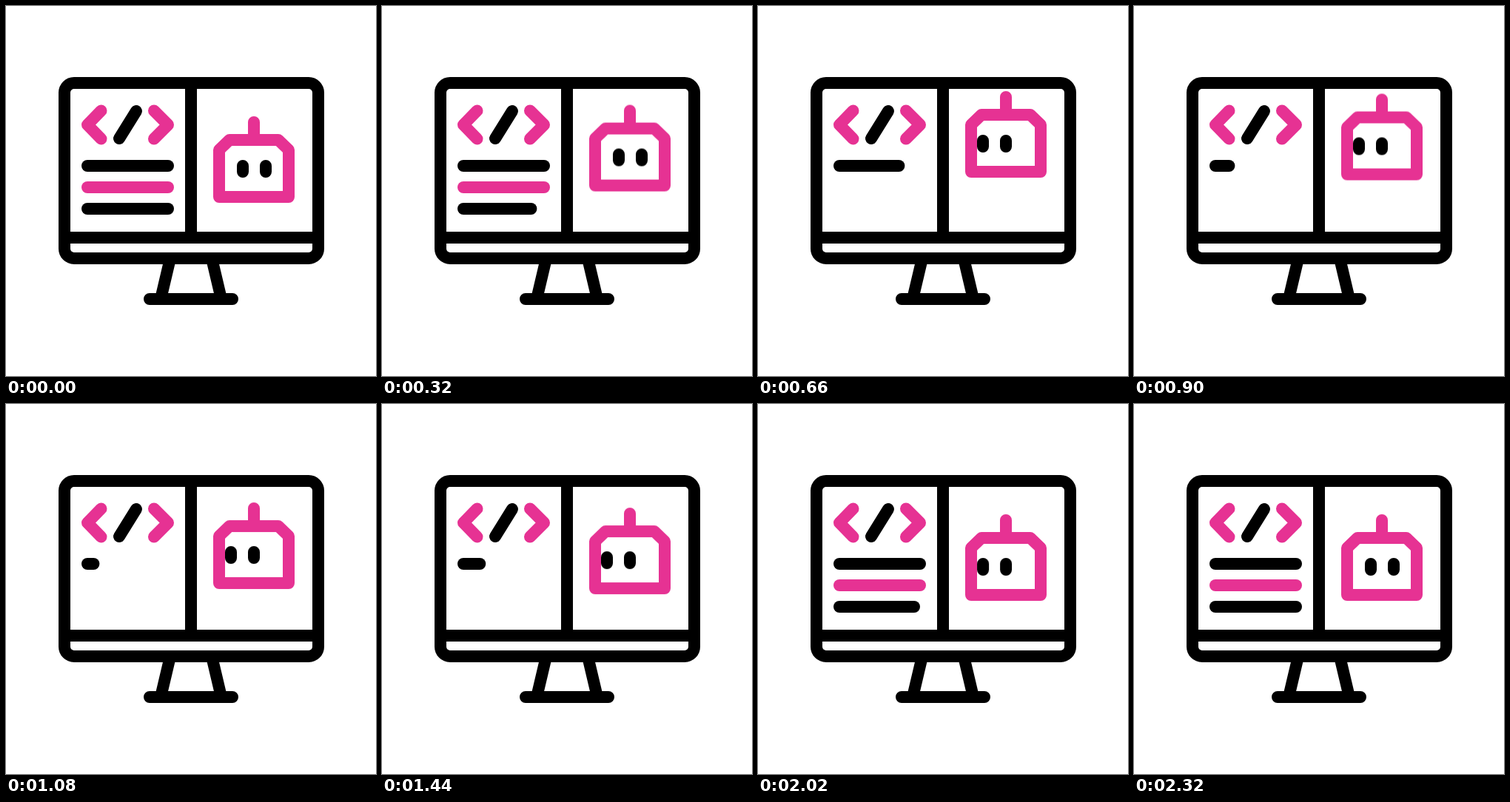
These frames come from a looping animation (500 by 500 pixels, 2400 ms). An HTML page:

```html
<!DOCTYPE html>
<html lang="en">
<head>
<meta charset="utf-8">
<title>Code and robot</title>
<style>
  @property --len {
    syntax: "<length>";
    inherits: true;
    initial-value: 327px;
  }
  html, body { margin: 0; width: 100%; height: 100%; overflow: hidden; background: #fff; }
  svg { display: block; width: 100vw; height: 100vh; }
  svg * {
    fill: none;
    stroke-width: 16px;
    stroke-linecap: round;
    stroke-linejoin: round;
  }
  .ink { stroke: #000; }
  .pink { stroke: #e63293; }

  /* One length is shared by the three bars, filled top to bottom. */
  .bars { animation: type 2400ms infinite; }
  .bars path {
    --part: calc(var(--len) - var(--from));
    stroke-dasharray: clamp(0px, var(--part), 109px) 400px;
    stroke-width: clamp(0px, var(--part) * 1000, 16px);
  }
  .robot { animation: bob 2400ms infinite; }
  .eyes { animation: look 2400ms infinite; }

  @keyframes type {
    0% { --len: 327px; animation-timing-function: cubic-bezier(.84, 0, .16, 1); }
    48.6% { --len: 7.5px; animation-timing-function: cubic-bezier(.84, 0, .16, 1); }
    93.1%, 100% { --len: 327px; }
  }
  @keyframes bob {
    0% { transform: translateY(0); animation-timing-function: cubic-bezier(.7, 0, .3, 1); }
    27.5% { transform: translateY(-34px); animation-timing-function: cubic-bezier(.85, 0, .6, 1); }
    53.3% { transform: translateY(0); animation-timing-function: cubic-bezier(.4, 0, .5, 1); }
    65.8% { transform: translateY(-14px); animation-timing-function: cubic-bezier(.4, 0, .5, 1); }
    76.7%, 100% { transform: translateY(0); }
  }
  @keyframes look {
    0%, 12.9% { transform: translateX(0); animation-timing-function: cubic-bezier(.6, 0, .4, 1); }
    27.1%, 83.3% { transform: translateX(-16px); animation-timing-function: cubic-bezier(.6, 0, .4, 1); }
    97.2%, 100% { transform: translateX(0); }
  }
</style>
</head>
<body>
<svg viewBox="0 0 500 500">
  <g class="ink">
    <rect x="79" y="104" width="343" height="237" rx="13"/>
    <path d="M250 104V313M79 313H422"/>
    <path d="M222 341L209 396M278 341L291 396M194 396H306"/>
    <path d="M176 142L153 179"/>
  </g>
  <path class="pink" d="M128.500 141.500L110 160.500L128.500 179.500M200 141.500L219 160.500L200 179.500"/>
  <g class="bars">
    <path class="ink" style="--from: 0px" d="M110 216H219"/>
    <path class="pink" style="--from: 109px" d="M110 245H219"/>
    <path class="ink" style="--from: 218px" d="M110 274H219"/>
  </g>
  <g class="robot">
    <path class="pink" d="M335 157V181M288 258V194.500L302 181H368L382 194.500V258Z"/>
    <g class="eyes">
      <path class="ink" d="M320 216V224M351 216V224"/>
    </g>
  </g>
</svg>
</body>
</html>
```
